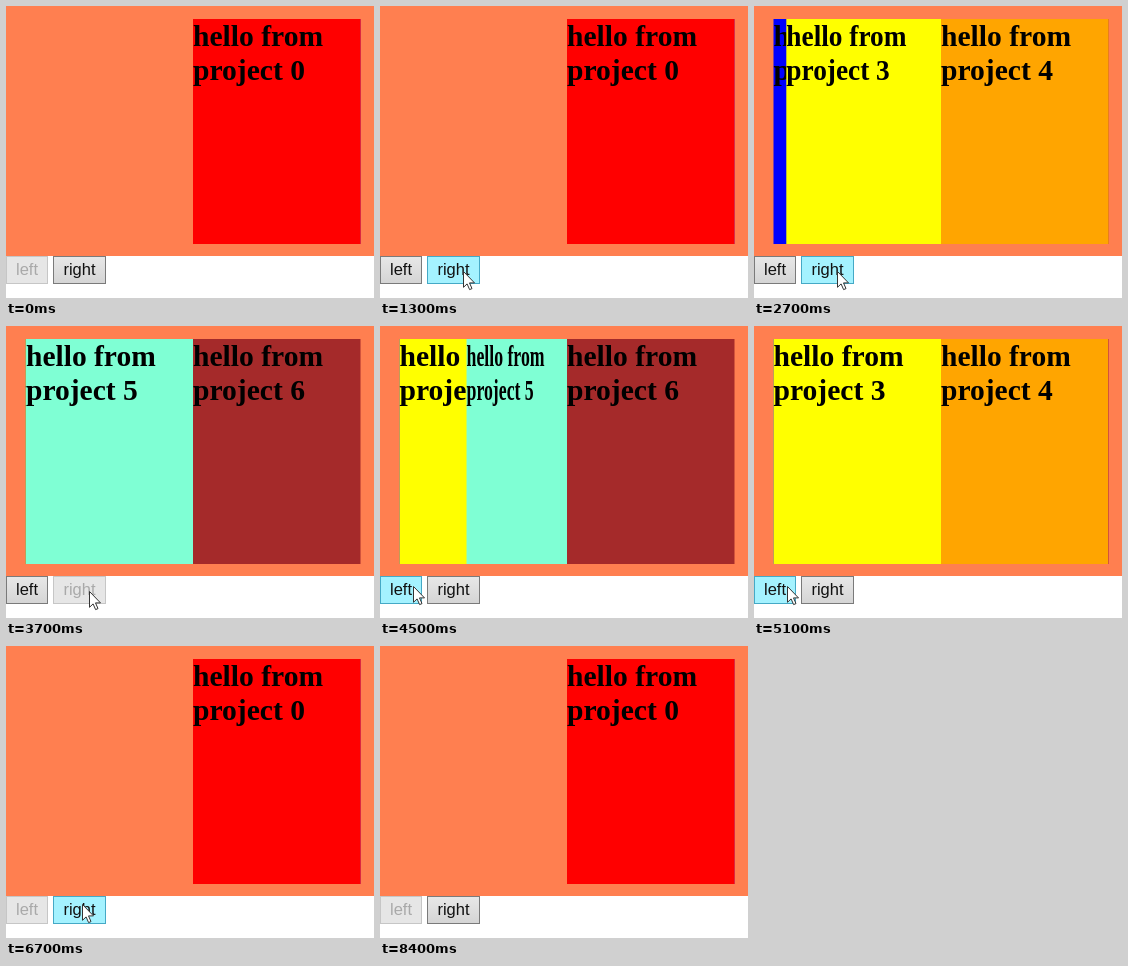
These frames come from a looping animation (368 px wide and 292 px high, 8600 ms). An HTML page with a canvas:

```html
<!DOCTYPE html>
<html>
<head>
<meta charset="utf-8">
<title>Page flip</title>
<style>
html, body { margin: 0; width: 100%; height: 100%; overflow: hidden; background: #fff; }
canvas { display: block; }
</style>
</head>
<body>
<canvas id="stage" width="368" height="292"></canvas>
<script>
const ctx = document.getElementById('stage').getContext('2d');
const LOOP = 8600, STEP = 100, FLIP = 1000;
const SPINE = 187, TOP = 13, PAGE_W = 167.5, PAGE_H = 225;
const COLORS = ['red', 'blue', 'blueviolet', 'yellow', 'orange', 'aquamarine', 'brown'];

// When each sheet is turned forward and back again
const SHEETS = [[1280, 5750], [2115, 5100], [2900, 4300], [Infinity, Infinity]];

// Pointer path: time, x, y
const PATH = [
  [1100, 83, 258], [1200, 83, 258], [1300, 83, 265], [3900, 83, 265],
  [4200, 33, 260], [6300, 33, 260], [6600, 60, 263], [6700, 76, 258]
];
const ARROW = new Path2D('M.5.5V16.3L4.1 12.9 6.6 18.6 9 17.6 6.5 11.9H11.5Z');

const clamp = v => Math.min(1, Math.max(0, v));
const bezier = (a, b, s) => 3 * a * s * (1 - s) ** 2 + 3 * b * s * s * (1 - s) + s ** 3;

// The CSS "ease" curve
function ease(x) {
  if (x <= 0) return 0;
  if (x >= 1) return 1;
  let lo = 0, hi = 1;
  for (let i = 0; i < 24; i++) {
    const mid = (lo + hi) / 2;
    if (bezier(.25, .25, mid) < x) lo = mid; else hi = mid;
  }
  return bezier(.1, 1, lo);
}

function pointer(t) {
  if (t < PATH[0][0]) return null;
  const next = PATH.findIndex(k => k[0] > t);
  if (next < 0) return PATH[PATH.length - 1].slice(1);
  const [t0, x0, y0] = PATH[next - 1], [t1, x1, y1] = PATH[next];
  const f = (t - t0) / (t1 - t0);
  return [x0 + (x1 - x0) * f, y0 + (y1 - y0) * f];
}

function drawPage(n, scale) {
  const x = n % 2 ? -PAGE_W : 0;
  ctx.save();
  ctx.translate(SPINE, TOP);
  ctx.scale(scale, 1);
  ctx.fillStyle = COLORS[n];
  ctx.fillRect(x, 0, PAGE_W, PAGE_H);
  ctx.fillStyle = '#000';
  ctx.font = 'bold 29.6px "Liberation Serif", serif';
  ctx.fillText('hello from', x, 27);
  ctx.fillText('project ' + n, x, 61);
  ctx.restore();
}

function drawBook(t) {
  const turns = SHEETS.map(([go, back]) =>
    Math.cos(Math.PI * (ease((t - go) / FLIP) - ease((t - back) / FLIP))));
  for (let i = turns.length - 1; i >= 0; i--)
    if (turns[i] > .001) drawPage(2 * i, turns[i]);
  turns.forEach((c, i) => { if (c < -.001) drawPage(2 * i + 1, -c); });
}

function drawButton(label, x, w, enabled, hover) {
  const fill = ctx.createLinearGradient(0, 250, 0, 278);
  fill.addColorStop(0, enabled ? '#e8e8e8' : '#e6e6e6');
  fill.addColorStop(1, enabled ? '#d4d4d4' : '#e6e6e6');
  ctx.fillStyle = fill;
  ctx.fillRect(x, 250, w, 28);
  if (enabled && hover) {
    ctx.globalAlpha = hover;
    ctx.fillStyle = '#a4f2ff';
    ctx.fillRect(x, 250, w, 28);
    ctx.globalAlpha = 1;
  }
  ctx.strokeStyle = !enabled ? '#c6c6c6' : hover > .5 ? '#45a9c6' : '#7a7a7a';
  ctx.strokeRect(x + .5, 250.5, w - 1, 27);
  ctx.fillStyle = enabled ? '#111' : '#a9a9a9';
  ctx.font = '16.5px "Liberation Sans", sans-serif';
  ctx.textAlign = 'center';
  ctx.fillText(label, x + w / 2, 269);
  ctx.textAlign = 'left';
}

function drawPointer([x, y], alpha) {
  ctx.save();
  ctx.globalAlpha = alpha;
  ctx.translate(x, y);
  ctx.fillStyle = '#fff';
  ctx.fill(ARROW);
  ctx.strokeStyle = '#333';
  ctx.stroke(ARROW);
  ctx.restore();
}

function draw(t) {
  ctx.fillStyle = '#fff';
  ctx.fillRect(0, 0, 368, 292);
  ctx.fillStyle = 'coral';
  ctx.fillRect(0, 0, 368, 250);
  drawBook(t);

  const turned = SHEETS.filter(([go, back]) => t >= go && t < back).length;
  const at = pointer(t), shown = clamp((8400 - t) / 500);
  const over = (x, w) => at && at[0] >= x && at[0] < x + w ? shown : 0;
  drawButton('left', 0, 42, turned > 0, over(0, 42));
  drawButton('right', 47, 53, turned < 3, over(47, 53));
  if (at && shown) drawPointer(at, shown);
}

const start = performance.now();
function tick() {
  const t = (performance.now() - start) % LOOP;
  draw(Math.floor(t / STEP) * STEP);
  requestAnimationFrame(tick);
}
tick();
</script>
</body>
</html>
```
